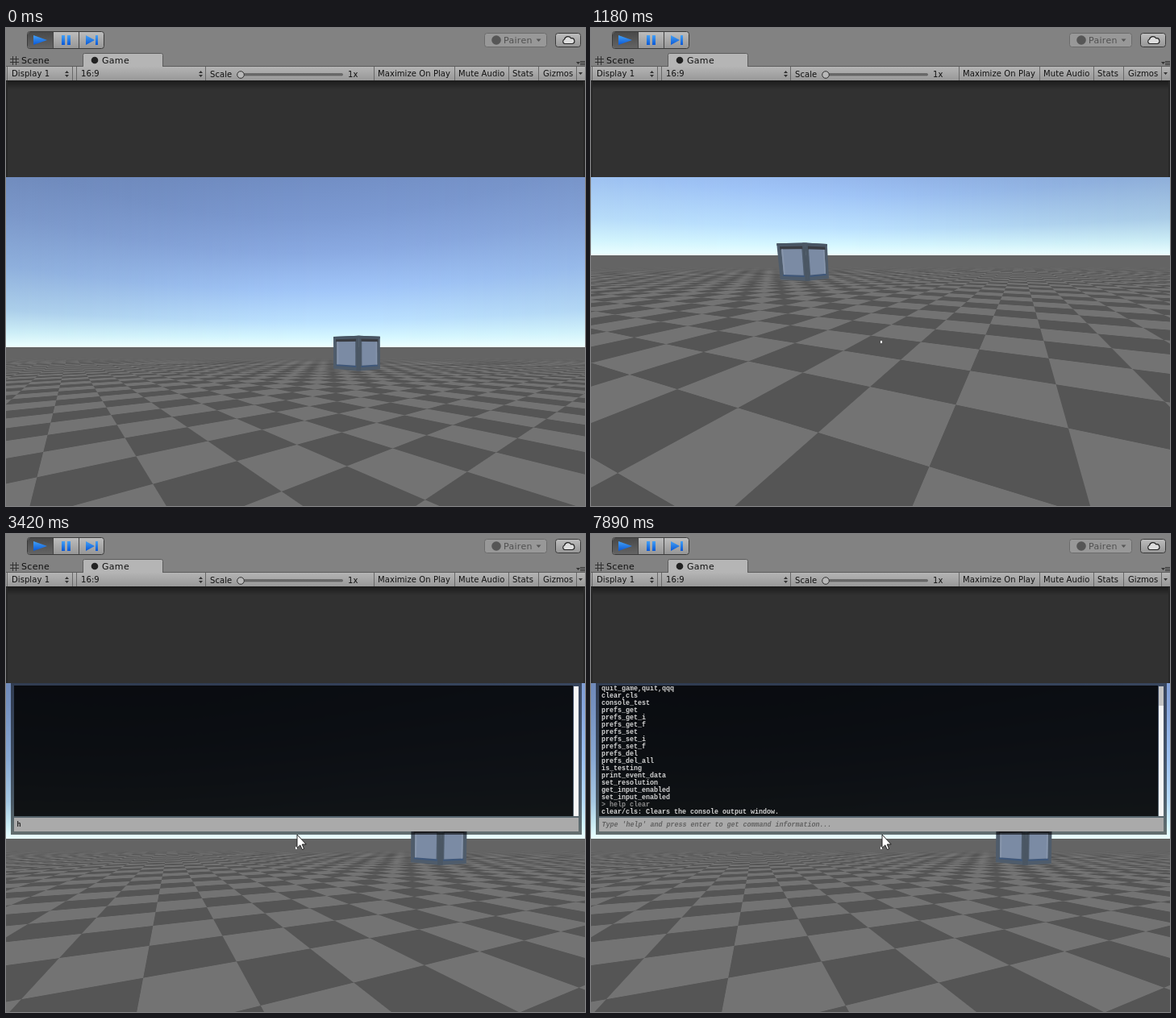
Animation, 718 px wide and 593 px high, one loop 8 s. Source, as an HTML page with a canvas:

```html
<!DOCTYPE html>
<html lang="en">
<head>
<meta charset="utf-8">
<title>Game view with console</title>
<style>
  html, body { margin: 0; width: 718px; height: 593px; overflow: hidden; background: #313131; }
  canvas, body > svg { position: absolute; left: 0; top: 0; display: block; }
  .ui { font: 10px "DejaVu Sans", sans-serif; fill: #111; letter-spacing: .08px; }
  .tab { font-size: 11px; letter-spacing: .3px; }
  .mono { font: bold 8.333px "Liberation Mono", monospace; fill: #d4d4d4; white-space: pre; }
</style>
</head>
<body>
<canvas id="scene" width="718" height="593"></canvas>
<svg width="718" height="593" viewBox="0 0 718 593">
  <defs>
    <linearGradient id="bar" x2="0" y2="1"><stop stop-color="#b4b4b4"/><stop offset="1" stop-color="#989898"/></linearGradient>
    <linearGradient id="button" x2="0" y2="1"><stop stop-color="#bebebe"/><stop offset="1" stop-color="#959595"/></linearGradient>
    <linearGradient id="pressed" x2="0" y2="1"><stop stop-color="#484848"/><stop offset="1" stop-color="#646464"/></linearGradient>
    <linearGradient id="blue" x2="0" y2="1"><stop stop-color="#43a0f5"/><stop offset="1" stop-color="#0a58d6"/></linearGradient>
    <linearGradient id="shadow" x2="0" y2="1"><stop stop-color="#1b1b1b"/><stop offset="1" stop-color="#313131"/></linearGradient>
  </defs>

  <g id="toolbar">
    <rect width="718" height="66" fill="#828282"/>
    <rect x="26.5" y="4.5" width="95" height="21" rx="3" fill="url(#button)" stroke="#3a3a3a"/>
    <path d="M58 5H29.500Q27 5 27 8V22Q27 25 29.500 25H58Z" fill="url(#pressed)"/>
    <path d="M58.500 5V25M90.500 5V25" stroke="#444"/>
    <path d="M34 9L51 15L34 21ZM69 9h4v12h-4ZM76 9h4v12h-4ZM99 9L110 15L99 21ZM111 9h3v12h-3Z" fill="url(#blue)"/>
    <rect x="593.500" y="6.500" width="77" height="17" rx="3" fill="#989898" stroke="#6c6c6c"/>
    <circle cx="608" cy="15" r="5.800" fill="#565656"/>
    <path d="M657.500 13.500h6l-3 3.500z" fill="#565656"/>
    <rect x="681.500" y="6.500" width="31" height="17" rx="3" fill="url(#button)" stroke="#3a3a3a"/>
    <path d="M692.500 19.500a3 3 0 0 1 0-5.500a4.500 4.500 0 0 1 8.200-1.200a3.400 3.400 0 0 1 1.500 6.700z" fill="#ddd" stroke="#222" stroke-width="1.200"/>
    <path d="M8.500 35V46M12.500 35V46M5 38.500H16M5 42.500H16" stroke="#333"/>
    <path d="M95.500 48V33.500Q95.500 31.500 97.500 31.500H192.500Q194.500 31.500 194.500 33.500V48" fill="#b5b5b5" stroke="#5c5c5c"/>
    <circle cx="110" cy="40" r="4.300" fill="#222"/>
    <path d="M707 42h5l-2.500 3zM712 41h6v1h-6zM712 43h6v1h-6zM712 45h6v1h-6z" fill="#333"/>
    <rect y="48" width="718" height="17" fill="url(#bar)"/>
    <path d="M0 47.500H95M195 47.500H718" stroke="#5c5c5c"/>
    <path d="M1.500 48V65M82.500 48V65M87.500 48V65M247.500 48V65M456.500 48V65M556.500 48V65M623.500 48V65M660.500 48V65M707.500 48V65" stroke="#686868"/>
    <path d="M73 56l2.500-3 2.500 3zM73 58h5l-2.500 3zM239 56l2.500-3 2.500 3zM239 58h5l-2.500 3zM710 55h5l-2.500 3z" fill="#333"/>
    <rect x="290.500" y="56.500" width="127" height="2.500" rx="1" fill="#6a6a6a" stroke="#555" stroke-width=".6"/>
    <circle cx="291" cy="58" r="4.300" fill="#b8b8b8" stroke="#333"/>
    <g class="ui">
      <text class="tab" x="617" y="19" style="fill:#505050">Pairen</text>
      <text class="tab" x="19" y="44">Scene</text><text class="tab" x="119" y="44">Game</text>
      <text x="7" y="60">Display 1</text><text x="93" y="60">16:9</text><text x="253" y="61">Scale</text>
      <text x="424" y="61">1x</text><text x="461" y="60">Maximize On Play</text><text x="561" y="60">Mute Audio</text>
      <text x="628" y="60">Stats</text><text x="666" y="60">Gizmos</text>
    </g>
    <rect y="65" width="718" height="120" fill="#313131"/>
    <rect y="65" width="718" height="11" fill="url(#shadow)"/>
    <path d="M1 66V185M717 66V185" stroke="#272727" stroke-width="2"/>
  </g>

  <rect id="dot" x="359" y="388" width="2" height="3" fill="#fff"/>

  <g id="console">
    <rect x="6" y="185" width="708" height="188" fill="#000" fill-opacity=".56"/>
    <rect x="10" y="188" width="693" height="162" fill="#000" fill-opacity=".8"/>
    <svg x="10" y="188" width="693" height="162"><g id="log" class="mono"></g></svg>
    <rect x="704" y="189" width="6" height="161" fill="#c4c4c4"/>
    <rect id="handle" x="704" width="6" fill="#f6f6f6"/>
    <rect x="10" y="352" width="700" height="17" fill="#aaa"/>
    <text id="input" class="mono" x="13.500" y="363"></text>
    <path d="M361 373v16.500l3.800-3.600 2.500 5.600 2.300-1-2.400-5.500h5z" fill="#fff" stroke="#111" stroke-width=".9"/>
  </g>
</svg>

<script>
const LOOP = 8000, W = 718, BOTTOM = 593, VIEW_TOP = 185;
const FOCAL = 353.3, CX = 360, CY = 389;
const EYE = { x: 1.412, y: -1.725, height: 1.49 };   // unit: one floor tile
const CUBE = { x: -9.94, y: 12.24, size: 2.17 };
const RAD = Math.PI / 180;
const $ = id => document.getElementById(id);
const clamp = (v, lo, hi) => Math.min(hi, Math.max(lo, v));
const ctx = $('scene').getContext('2d');

// time, heading in degrees, height of the horizon on the stage
const LOOK = [
  [380, -51.5, 395.5], [700, -46, 360], [1000, -37.3, 314.5], [1180, -25, 282],
  [1340, -8, 217], [1480, 2, 300], [1570, -2.4, 381.3], [1700, -38, 383],
  [1840, -61.5, 378], [2000, -65.8, 378], [2130, -66, 378]
];

function lookAt(t, axis) {
  const last = LOOK.length - 1;
  if (t <= LOOK[0][0]) return LOOK[0][axis];
  if (t >= LOOK[last][0]) return LOOK[last][axis];
  const i = LOOK.findIndex(k => k[0] > t) - 1;
  const slope = n => n < 1 || n >= last ? 0 :
    (LOOK[n + 1][axis] - LOOK[n - 1][axis]) / (LOOK[n + 1][0] - LOOK[n - 1][0]);
  const [a, b] = [LOOK[i], LOOK[i + 1]], span = b[0] - a[0], s = (t - a[0]) / span;
  return a[axis] + s * s * (3 - 2 * s) * (b[axis] - a[axis])
    + span * s * (1 - s) * ((1 - s) * slope(i) - s * slope(i + 1));
}

function cameraAt(t) {
  const heading = lookAt(t, 1) * RAD, horizon = lookAt(t, 2);
  const pitch = Math.atan((CY - horizon) / FOCAL);
  return { heading, horizon, sinH: Math.sin(heading), cosH: Math.cos(heading),
           sinP: Math.sin(pitch), cosP: Math.cos(pitch) };
}

// tangent of elevation, then colour; the sky darkens away from the SUN direction
const SUN = -42 * RAD;
const SKY = [
  [0, 236, 255, 255], [.035, 212, 246, 255], [.09, 187, 225, 255], [.2, 160, 197, 248],
  [.33, 138, 170, 226], [.45, 124, 154, 210], [.62, 112, 140, 194]
];

function drawSky(cam) {
  const flat = FOCAL / cam.cosP, step = 4, top = SKY[SKY.length - 1][0];
  for (let x = 0; x < W; x += step) {
    const dx = x + step / 2 - CX, reach = Math.hypot(flat, dx);
    const side = Math.sin(cam.heading + Math.atan2(dx, flat) - SUN) ** 2;
    const grad = ctx.createLinearGradient(0, cam.horizon, 0, cam.horizon - top * reach);
    for (const [e, ...rgb] of SKY) {
      const shade = 1 - .17 * side * Math.min(1, e * 8);
      grad.addColorStop(e / top, `rgb(${rgb.map(c => Math.round(c * shade))})`);
    }
    ctx.fillStyle = grad;
    ctx.fillRect(x, VIEW_TOP, step, BOTTOM - VIEW_TOP);
  }
}

// square wave of period 2 with edges softened over the given width
function wave(u, soft) {
  const q = u - .5, m = q - 2 * Math.floor(q / 2 + .5);
  return clamp((1 - 2 * Math.abs(m)) / soft, -1, 1);
}

function drawFloor(cam) {
  const top = Math.ceil(cam.horizon), rows = BOTTOM - top;
  const image = ctx.createImageData(W, rows), pixels = new Uint32Array(image.data.buffer);
  for (let r = 0, n = 0; r < rows; r++) {
    const dy = top + r + .5 - CY;
    const down = Math.max(.1, dy * cam.cosP + FOCAL * cam.sinP);
    const forward = FOCAL * cam.cosP - dy * cam.sinP, scale = EYE.height / down;
    const fade = 15 * clamp((down - 13) / 7, 0, 1);
    for (let x = 0; x < W; x++) {
      const dx = x + .5 - CX;
      const u = scale * (forward * cam.sinH + dx * cam.cosH);
      const v = scale * (forward * cam.cosH - dx * cam.sinH);
      const softU = .7 * (scale * Math.abs(cam.cosH) + Math.abs(u) / down);
      const softV = .7 * (scale * Math.abs(cam.sinH) + Math.abs(v) / down);
      const grey = Math.round(100 + fade * wave(u + EYE.x, softU) * wave(v + EYE.y, softV));
      pixels[n++] = 0xff000000 | grey * 0x010101;
    }
  }
  ctx.putImageData(image, 0, top);
}

function project(cam, x, y, z) {
  const dx = x - EYE.x, dy = y - EYE.y, drop = EYE.height - z;
  const ahead = dx * cam.sinH + dy * cam.cosH;
  const k = FOCAL / (ahead * cam.cosP + drop * cam.sinP);
  return [CX + k * (dx * cam.cosH - dy * cam.sinH), CY + k * (drop * cam.cosP - ahead * cam.sinP)];
}

// one face in its own 0..1 coordinates: a runs away from the near edge, b runs up
const PANELS = [
  [0, 1, 0, 1, '#4f5c6b'], [0, 1, .94, 1, '#485563'], [0, .09, 0, 1, '#4a5663'],
  [.1, .88, .1, .15, '#3f5779'], [.1, .9, .84, .92, '#393c42'],
  [.13, .85, .15, .84, '#7b8ba4'], [.79, .85, .15, .84, '#8795ab']
];

function drawCube(cam) {
  const faces = [
    (a, b) => project(cam, CUBE.x - a * CUBE.size, CUBE.y, b * CUBE.size),
    (a, b) => project(cam, CUBE.x, CUBE.y + a * CUBE.size, b * CUBE.size)
  ];
  for (const at of faces) for (const [a0, a1, b0, b1, color] of PANELS) {
    ctx.fillStyle = color;
    ctx.beginPath();
    for (const [a, b] of [[a0, b0], [a1, b0], [a1, b1], [a0, b1]]) ctx.lineTo(...at(a, b));
    ctx.fill();
  }
}

const OPEN = 2460, HELP = 4030, DETAIL = 6630;
const HINT = "Type 'help' and press enter to get command information...";
const LINES = `> help
help,?,cmds
set_console_transparancy,set_console_alpha,console_alpha
quit_game,quit,qqq
clear,cls
console_test
prefs_get
prefs_get_i
prefs_get_f
prefs_set
prefs_set_i
prefs_set_f
prefs_del
prefs_del_all
is_testing
print_event_data
set_resolution
get_input_enabled
set_input_enabled
> help clear
clear/cls: Clears the console output window.`.split('\n');

const TYPING = [
  { word: 'help', keys: [3420, 3510, 3690, 3720], enter: HELP },
  { word: 'help clear', keys: [5380, 5480, 5680, 5710, 5990, 6060, 6120, 6190, 6250, 6320], enter: DETAIL }
];

const rows = LINES.map((line, i) => {
  const row = document.createElementNS('http://www.w3.org/2000/svg', 'text');
  row.textContent = line;
  row.setAttribute('x', 3);
  row.setAttribute('y', 6 + 9 * i);
  if (line[0] === '>') row.style.fill = '#8a8a8a';
  return $('log').appendChild(row);
});

function drawConsole(t) {
  $('dot').style.display = t >= LOOK[0][0] ? '' : 'none';
  $('console').style.display = t >= OPEN ? '' : 'none';

  const count = t < HELP ? 0 : t < DETAIL ? 19 : 21;
  const scroll = t < HELP + 50 ? 0 : t < DETAIL + 60 ? 1 : 3;
  rows.forEach((row, i) => row.style.display = i < count ? '' : 'none');
  $('log').setAttribute('transform', `translate(0 ${-9 * scroll})`);
  const handleTop = 189 + (scroll ? 161 * scroll / count + 1 : 0);
  $('handle').setAttribute('y', handleTop);
  $('handle').setAttribute('height', 350 - handleTop);

  const now = TYPING.find(w => t >= w.keys[0] && t < w.enter);
  const input = $('input');
  input.textContent = now ? now.word.slice(0, now.keys.filter(k => k <= t).length) : HINT;
  input.style.fill = now ? '#222' : '#626262';
  input.style.fontStyle = now ? 'normal' : 'italic';
}

let drawnLook = '';
function frame(now) {
  const t = now % LOOP, cam = cameraAt(t), look = cam.heading + '/' + cam.horizon;
  if (look !== drawnLook) {
    drawSky(cam);
    drawFloor(cam);
    drawCube(cam);
    drawnLook = look;
  }
  drawConsole(t);
  requestAnimationFrame(frame);
}
frame(0);
</script>
</body>
</html>
```
